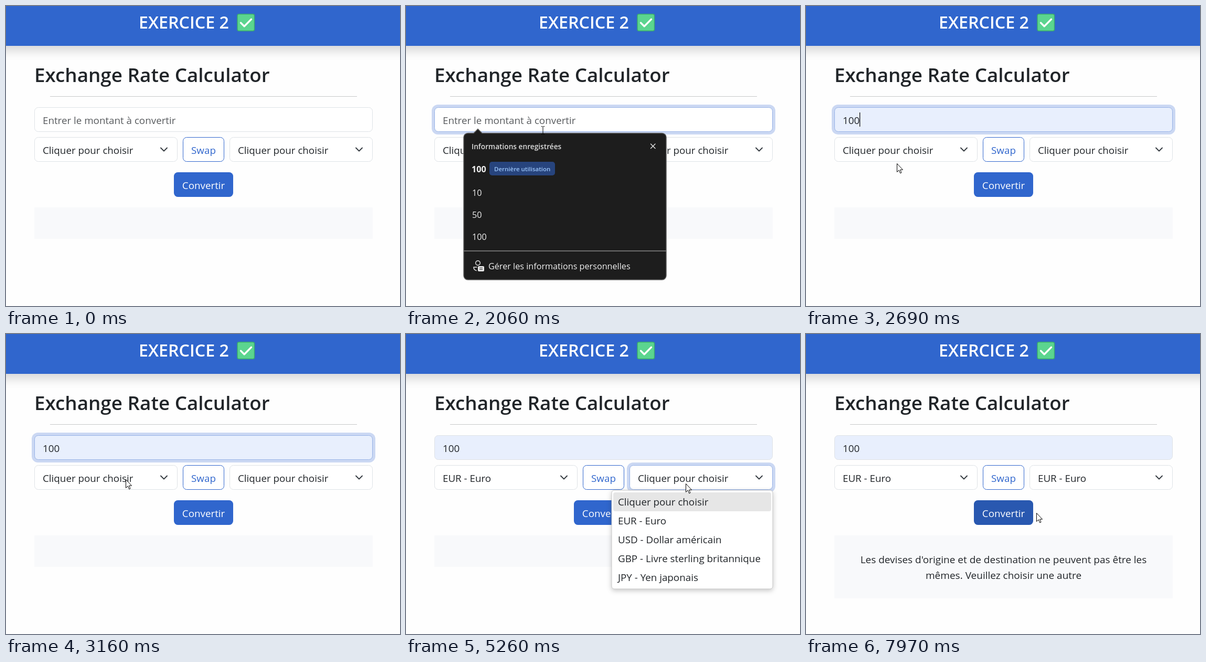
Animation, 751 px wide and 572 px high, one loop 8000 ms. Source, as an HTML page:

```html
<!DOCTYPE html>
<html lang="fr">
<head>
<meta charset="utf-8">
<title>Exchange Rate Calculator</title>
<style>
  html, body { margin: 0; width: 100%; height: 100%; overflow: hidden; background: #fefefe; }
  svg { display: block; }
  text { font: 18.8px "Open Sans", "Noto Sans", sans-serif; fill: #212529; white-space: pre; }
  .head { font-size: 32.2px; font-weight: 600; fill: #fff; }
  .title { font-size: 36.8px; font-weight: 600; }
  .mid { text-anchor: middle; }
  .field { fill: #fff; stroke: #dee2e6; }
  .ring { fill: #3066cd; fill-opacity: .25; }
  .chevron { fill: none; stroke: #343a40; stroke-width: 1.9; stroke-linecap: round; stroke-linejoin: round; }
  #message text { font-size: 19px; }
  #popup text { font-size: 16.2px; fill: #f0f0f0; }
  #popup .label { font-size: 13.7px; font-weight: 600; fill: #dedede; }
  #popup .badge { font-size: 11.5px; font-weight: 600; fill: #9cc6fa; }
  #popup .bold { font-weight: 700; }
  .line { fill: none; stroke: #e8e8e8; stroke-width: 1.4; stroke-linecap: round; }
  .menu { filter: drop-shadow(0 3px 5px rgba(0, 0, 0, .22)); }
  .pointer { fill: #fff; stroke: #000; stroke-linejoin: round; }
</style>
</head>
<body>
<svg width="751" height="572" viewBox="0 0 751 572">
  <defs>
    <filter id="blur" x="-10%" y="-60%" width="120%" height="220%"><feGaussianBlur stdDeviation="10"/></filter>
  </defs>

  <rect y="10" x="-30" width="811" height="76" fill="#000" opacity=".15" filter="url(#blur)"/>
  <rect width="751" height="76" fill="#3066cd"/>
  <text class="head" x="253" y="43">EXERCICE 2</text>
  <rect x="441" y="15.5" width="32.5" height="32" rx="3" fill="#5bd58f" stroke="#3bab6c" stroke-width="1.5"/>
  <path d="M447.5 32l6.7 6.7 13.3-13.4" fill="none" stroke="#fff" stroke-width="3.4" stroke-linecap="round" stroke-linejoin="round"/>

  <text class="title" x="54" y="145">Exchange Rate Calculator</text>
  <path d="M84 172.5H669" stroke="#c7c8c9"/>

  <g id="amount">
    <rect class="ring" x="49" y="188" width="655" height="57" rx="12"/>
    <rect class="field" x="54.5" y="193.5" width="644" height="46" rx="7"/>
    <text x="70" y="225"></text>
  </g>
  <rect id="caret" y="203" width="1.2" height="27" fill="#000"/>

  <g id="from">
    <rect class="ring" x="49" y="245" width="283" height="57" rx="12"/>
    <rect class="field" x="54.5" y="250.5" width="272" height="46" rx="7"/>
    <text x="70" y="282"></text>
    <path class="chevron" d="M295 270.5l6 6 6-6"/>
  </g>
  <g id="to">
    <rect class="ring" x="421" y="245" width="283" height="57" rx="12"/>
    <rect class="field" x="426.5" y="250.5" width="272" height="46" rx="7"/>
    <text x="442" y="282"></text>
    <path class="chevron" d="M667 270.5l6 6 6-6"/>
  </g>

  <g id="swap">
    <rect x="337.5" y="250.5" width="78" height="46" rx="7" stroke="#3066cd"/>
    <text class="mid" x="376.5" y="282">Swap</text>
  </g>
  <g id="convert">
    <rect x="320" y="317" width="113" height="47" rx="7.5"/>
    <text class="mid" x="376.5" y="349" style="fill:#fff">Convertir</text>
  </g>

  <rect id="panel" x="54" y="384" width="645" fill="#f8f9fb"/>
  <g id="message">
    <text class="mid" x="376.5" y="437">Les devises d'origine et de destination ne peuvent pas être les</text>
    <text class="mid" x="376.5" y="467">mêmes. Veuillez choisir une autre</text>
  </g>

  <g id="menu" class="menu">
    <rect width="307" height="188" y="298" rx="5" fill="#fff" stroke="#c8c8c8"/>
    <rect id="option" x="3" width="301" height="36" rx="4" fill="#e6e6e6"/>
  </g>

  <g id="popup">
    <path d="M118 242.5H129L137 234.5 145 242.5H488a8 8 0 0 1 8 8V514a8 8 0 0 1-8 8H118a8 8 0 0 1-8-8V250.5a8 8 0 0 1 8-8z"
      fill="#1d1d1d" stroke="#5c5c5c" stroke-width="1.5"/>
    <text class="label" x="125" y="273">Informations enregistrées</text>
    <path class="line" d="M466.5 263l8.5 8.5m0-8.5l-8.5 8.5"/>
    <rect id="row" x="116" y="287" width="380" height="48" rx="4" fill="#fff" opacity=".05"/>
    <text class="bold" x="125" y="317">100</text>
    <rect x="159" y="297" width="125" height="26" rx="5" fill="#27447d"/>
    <text class="badge" x="168" y="315">Dernière utilisation</text>
    <text x="126" y="362">10</text>
    <text x="126" y="404">50</text>
    <text x="126" y="446">100</text>
    <path d="M110 467H496" stroke="#878787" stroke-width="1.5"/>
    <circle class="line" cx="137" cy="490" r="4.3"/>
    <path class="line" d="M134 504.500Q129 503 129 498H135"/>
    <rect x="137" y="496" width="12" height="10" rx="2" fill="#e8e8e8"/>
    <path d="M140 499.500h6m-6 3h6" stroke="#1d1d1d"/>
    <text x="157" y="502">Gérer les informations personnelles</text>
  </g>

  <g id="cursor">
    <path id="arrow" class="pointer" d="M.5 .5V16.500L4.200 13 6.700 18.800 9 17.800 6.600 12.200H11.500Z"/>
    <path id="beam" d="M-3 -7.500H-1L0 -6.500 1 -7.500H3M0 -6.500V6.500M-3 7.500H-1L0 6.500 1 7.500H3" fill="none" stroke="#000"/>
    <path id="hand" class="pointer" d="M-1.500 1.500a1.600 1.600 0 0 1 3.200 0V7.500Q4.500 6.500 5 8.500 7.500 7.500 8 9.500 10.500 9 10.500 11.500V15.500Q10 18 8.500 21.500H0Q-2 17.500-5 13.500-5.500 11-3.500 11.500L-1.500 13.500Z"/>
  </g>
</svg>
<script>
const LOOP = 8000;
const $ = id => document.getElementById(id);
const show = (id, on) => $(id).setAttribute('visibility', on ? 'visible' : 'hidden');
const clamp = v => Math.max(0, Math.min(1, v));
const ramp = (t, a, b) => clamp((t - a) / (b - a));
const during = (t, a, b) => t >= a && t < b;
const mix = (a, b, p) => 'rgb(' + a.map((v, i) => Math.round(v + (b[i] - v) * p)) + ')';

const BLUE = [48, 102, 205], DARK = [41, 87, 174], WHITE = [255, 255, 255];
const GREY = [222, 226, 230], FOCUS = [152, 179, 230];
const PROMPT = 'Cliquer pour choisir', EURO = 'EUR - Euro';

// start, end, steps, x, y
const START = [775, 362];
const MOVES = [
  [70, 280, 4, 588, 328],
  [610, 1220, 9, 277, 225],
  [1930, 2410, 8, 173, 300],
  [2960, 3160, 4, 228, 277],
  [3630, 4000, 6, 146, 353],
  [4360, 5120, 12, 533, 285],
  [5520, 5950, 7, 483, 356],
  [6600, 6950, 6, 366, 323],
  [7760, 7970, 4, 439, 341]
];

// x, y, right, bottom
const AREAS = {
  swap: [337, 250, 416, 297],
  convert: [320, 317, 433, 364]
};

function pointer(t) {
  let [x, y] = START;
  for (const [a, b, n, tx, ty] of MOVES) {
    if (t < a) break;
    const k = Math.floor(ramp(t, a, b) * (n - 1) + 1e-6) + 1;
    const p = k / n, e = p * p * (3 - 2 * p);
    x += (tx - x) * e;
    y += (ty - y) * e;
  }
  return [x, y];
}

const popupAlpha = t => t < 1360 || t >= 2690 ? 0 : t < 2550 ? 1 : t < 2620 ? .79 : .4;
const menuAt = t => during(t, 3370, 4090) ? 54 : during(t, 5260, 6070) ? 392 : 0;

function over(id, t) {
  if (popupAlpha(t) || menuAt(t)) return false;
  const [x, y] = pointer(t), [l, u, r, d] = AREAS[id];
  return x >= l && x < r && y >= u && y < d;
}

// share of the last 150 ms spent over the area
function hover(id, t) {
  let sum = 0;
  for (let i = 0; i < 15; i++) sum += over(id, Math.max(0, t - i * 10));
  return sum / 15;
}

// the ring grows in more slowly than the border
function field(id, focus, value, color) {
  const [ring, box] = $(id).querySelectorAll('rect');
  const label = $(id).querySelector('text');
  ring.setAttribute('opacity', focus * focus);
  box.style.stroke = mix(GREY, FOCUS, focus);
  box.style.fill = color;
  if (label.textContent !== value) label.textContent = value;
}

function draw(t) {
  const [x, y] = pointer(t);
  const alpha = popupAlpha(t), menu = menuAt(t);
  const rowOn = alpha > 0 && y > 287;
  const filled = rowOn || t >= 2480;

  field('amount', ramp(t, 1275, 1360) - ramp(t, 3270, 3370), filled ? '100' : 'Entrer le montant à convertir',
    filled ? '#e8effd' : '#fff');
  $('amount').querySelector('text').style.fill = filled ? '#212529' : '#585b5e';
  field('from', ramp(t, 3270, 3370) - ramp(t, 5150, 5260), t < 4090 ? PROMPT : EURO, '#fff');
  field('to', ramp(t, 5150, 5260) - ramp(t, 6980, 7080), t < 6070 ? PROMPT : EURO, '#fff');

  show('caret', during(t, 1290, 1790) || during(t, 2290, 2960));
  $('caret').setAttribute('x', t < 2480 ? 70 : 102);

  const swap = hover('swap', t);
  $('swap').children[0].style.fill = mix(WHITE, BLUE, swap);
  $('swap').children[1].style.fill = mix(BLUE, WHITE, swap);
  $('convert').children[0].style.fill = mix(BLUE, DARK, hover('convert', t));

  const done = t >= 7080;
  $('panel').setAttribute('height', done ? 120 : 60);
  show('message', done);

  show('menu', menu);
  $('menu').setAttribute('transform', `translate(${menu} 0)`);
  const pick = Math.max(0, Math.min(4, Math.floor((y - 302) / 36)));
  $('option').setAttribute('y', 302 + pick * 36);

  $('popup').setAttribute('opacity', alpha);
  show('row', rowOn);

  const inText = y < 240 && y >= 193;
  const onButton = over('swap', t) || over('convert', t);
  show('beam', inText);
  show('hand', onButton);
  show('arrow', !inText && !onButton);
  $('cursor').setAttribute('transform', `translate(${Math.round(x)} ${Math.round(y)})`);
}

[PROMPT, EURO, 'USD - Dollar américain', 'GBP - Livre sterling britannique', 'JPY - Yen japonais'].forEach((name, i) => {
  const label = document.createElementNS('http://www.w3.org/2000/svg', 'text');
  label.setAttribute('x', 12);
  label.setAttribute('y', 327 + i * 36);
  label.textContent = name;
  $('menu').append(label);
});

function tick() {
  draw(performance.now() % LOOP);
  requestAnimationFrame(tick);
}
tick();
</script>
</body>
</html>
```
